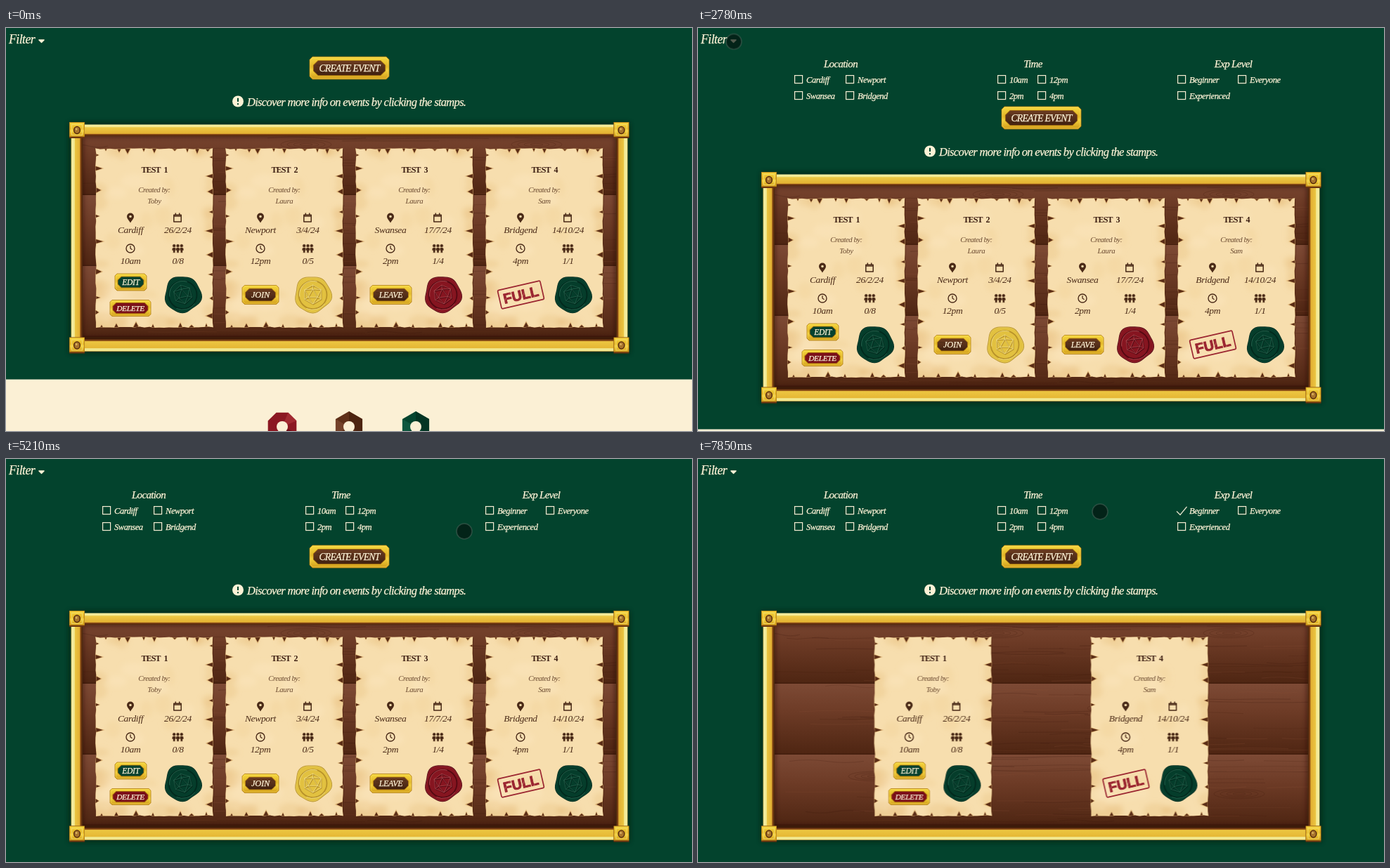
These frames come from a looping animation (976 by 574 pixels, 8 s). An HTML page:

```html
<!DOCTYPE html>
<html lang="en">
<head>
<meta charset="utf-8">
<title>Event board</title>
<style>
html, body { margin: 0; width: 100%; height: 100%; overflow: hidden; background: #03432d; }
svg { display: block; width: 976px; height: 574px; }
text { font-family: "Liberation Serif", "Times New Roman", serif; font-style: italic; }
.cream { fill: #fdf2d6; stroke: #fdf2d6; stroke-width: .25px; }
.ink { fill: #4a2a17; }
.faint { fill: #6b4a30; }
.title { fill: #3a1c10; font-style: normal; font-weight: bold; word-spacing: 3px; }
.full { fill: #9b2631; stroke: #9b2631; stroke-width: .9px; font: bold 20px "Liberation Sans", Arial, sans-serif; }

.board, .filters, .cursor, .click, .gone, .right, .left, .on, .off {
  animation: 8s step-end infinite;
}
.board { animation-name: drop; }
.filters { animation-name: open; }
.cursor { animation-name: roam; }
.click { animation-name: click; }
.gone, .off { animation-name: gone; }
.on { animation-name: on; }
.right { animation-name: right; }
.left { animation-name: left; }

@keyframes drop {
  0% { transform: translateY(0); }
  34.75% { transform: translateY(71px); }
  37.25% { transform: translateY(82px); }
}
@keyframes open { 0% { opacity: 0; } 34.75% { opacity: 1; } }
@keyframes gone { 0% { opacity: 1; } 77.875% { opacity: 0; } }
@keyframes on { 0% { opacity: 0; } 77.875% { opacity: 1; } }
@keyframes right { 0% { transform: none; } 77.875% { transform: translateX(123.4px); } }
@keyframes left { 0% { transform: none; } 77.875% { transform: translateX(-123.6px); } }
@keyframes click { 0% { opacity: 0; } 75.5% { opacity: 1; } 77.875% { opacity: 0; } }
@keyframes roam {
  0% { opacity: 0; transform: translate(367px, 550px); }
  7.375% { opacity: 1; transform: translate(367px, 550px); }
  10% { transform: translate(72px, 474px); }
  15.25% { transform: translate(57px, 316px); }
  17.625% { transform: translate(74px, 170px); }
  20.125% { transform: translate(86px, 90px); }
  22.625% { transform: translate(83px, 55px); }
  25% { transform: translate(70px, 30px); }
  27.375% { transform: translate(51px, 20.8px); }
  29.875% { transform: translate(51px, 19.5px); }
  45.125% { transform: translate(92px, 30px); }
  47.625% { transform: translate(260px, 82px); }
  50.125% { transform: translate(468px, 146px); }
  52.625% { transform: translate(558px, 169px); }
  57.75% { transform: translate(575px, 158px); }
  60.25% { transform: translate(612px, 131px); }
  62.75% { transform: translate(652px, 103px); }
  65.25% { transform: translate(685px, 82px); }
  67.875% { transform: translate(701px, 74px); }
  70.375% { transform: translate(694px, 73px); }
  72.875% { transform: translate(689px, 70px); }
  77.875% { transform: translate(690px, 70.5px); }
  80.5% { transform: translate(691px, 70px); }
  90.5% { transform: translate(680px, 64px); }
  93% { transform: translate(640px, 57px); }
  95.625% { transform: translate(596px, 64px); }
  98.125% { transform: translate(572px, 75px); }
}
</style>
</head>
<body>
<svg id="stage" viewBox="0 0 976 574" xmlns="http://www.w3.org/2000/svg"></svg>
<script>
let seed = 11;
const rnd = (a = 0, b = 1) => {
  seed = seed * 16807 % 2147483647;
  return a + (b - a) * seed / 2147483647;
};
const many = (n, f) => Array.from({ length: n }, (_, i) => f(i)).join('');
const text = (x, y, s, size, cls, ls = 0, anchor = 'middle') =>
  `<text x="${x}" y="${y}" font-size="${size}" class="${cls}" letter-spacing="${ls}" text-anchor="${anchor}">${s}</text>`;
const rect = (x, y, w, h, fill, more = '') =>
  `<rect x="${x}" y="${y}" width="${w}" height="${h}" fill="${fill}" ${more}/>`;
const at = (x, y, body) => `<g transform="translate(${x} ${y})">${body}</g>`;
const grad = (id, stops, flat) =>
  `<linearGradient id="${id}" x2="${flat ? 1 : 0}" y2="${flat ? 0 : 1}">` +
  stops.map(([o, c]) => `<stop offset="${o}" stop-color="${c}"/>`).join('') + '</linearGradient>';
const ring = (n, r, turn = 0) =>
  Array.from({ length: n }, (_, i) => {
    const a = turn + i * 2 * Math.PI / n, d = typeof r === 'function' ? r(a) : r;
    return [(d * Math.cos(a)).toFixed(2), (d * Math.sin(a)).toFixed(2)];
  });

// Wood planks with grain and a few knots
function wood() {
  const grain = y => many(46, () => {
    const x = rnd(90, 840), len = rnd(50, 240), b = rnd(-4, 4).toFixed(1);
    const dark = rnd() < .65;
    return `<path d="M${x.toFixed(0)} ${(y + rnd(3, 98)).toFixed(1)}q${(len / 4).toFixed(0)} ${b} ${(len / 2).toFixed(0)} 0t${(len / 2).toFixed(0)} 0"
      stroke="${dark ? '#3b180a' : '#95593e'}" stroke-opacity="${dark ? .2 : .16}" stroke-width="${rnd(.6, 1.4).toFixed(1)}"/>`;
  });
  const knot = (x, y) => many(4, i =>
    `<ellipse cx="${x}" cy="${y}" rx="${9 + i * 9}" ry="${1.5 + i * 1.8}" stroke="#3b180a" stroke-opacity=".22"/>`);
  const plank = y => rect(106, y, 764, 101, 'url(#plank)') + rect(106, y + 99.5, 764, 1.5, '#3d1a0b', 'opacity=".6"');
  return `<g clip-path="url(#inside)" fill="none">${[137, 238, 339].map(y => plank(y) + grain(y)).join('')}
    ${rect(106, 440, 764, 12, '#4a2110')}
    ${[[427, 166], [755, 166], [590, 273], [250, 370], [770, 395]].map(p => knot(...p)).join('')}
    <rect x="104" y="149" width="768" height="297" stroke="#280e04" stroke-width="12" opacity=".55" filter="url(#soft)"/></g>`;
}

function frame() {
  const corner = (x, y) => at(x, y,
    rect(-11, -11.5, 22, 23, '#6b3510') + rect(-10.5, -11, 21, 20, 'url(#gold)', 'stroke="#c08a20" stroke-width=".8"') +
    rect(-7.5, -8, 15, 15, 'none', 'stroke="#f8e176" stroke-opacity=".8"') +
    '<ellipse rx="5" ry="5.8" fill="#4c220d"/><ellipse rx="3.6" ry="4.4" fill="#a8742c"/><ellipse cx="-.8" cy="-1.4" rx="1.4" ry="1.6" fill="#d9b160"/>');
  return rect(95, 140, 787, 318, 'none', 'stroke="#001a10" stroke-width="10" opacity=".7" filter="url(#soft)"') +
    wood() +
    rect(92.5, 146, 16.5, 306, 'url(#barL)') + rect(868, 146, 16.5, 306, 'url(#barR)') +
    rect(101, 137.5, 775, 16.5, 'url(#barT)') + rect(101, 443, 775, 18, 'url(#barB)') +
    [101, 875.5].map(x => corner(x, 145.5) + corner(x, 452)).join('');
}

// Torn paper: jittered outline plus dark rips along each side
function paper() {
  const W = 168, H = 256, pts = [], j = () => rnd(0, 1.5);
  for (let x = 0; x < W; x += 7) pts.push([x, j()]);
  for (let y = 0; y < H; y += 8) pts.push([W - j(), y]);
  for (let x = W; x > 0; x -= 7) pts.push([x, H - j()]);
  for (let y = H; y > 0; y -= 8) pts.push([j(), y]);
  const d = 'M' + pts.map(p => p.map(v => v.toFixed(1)).join(' ')).join('L') + 'Z';
  const rip = (x, y, dx, dy, n, w) => {
    const tri = (k, c) => `<path d="M${x - dy * w * k} ${y - dx * w * k}L${x + dx * n * k} ${y + dy * n * k}L${x + dy * w * k} ${y + dx * w * k}Z" fill="${c}"/>`;
    return tri(1.25, '#dfb677') + tri(1, '#5b2d16');
  };
  const side = (list, place) => list.map((p, i) => {
    const [x, y, dx, dy] = place(p);
    return rip(x, y, dx, dy, dx ? 5 + i * 5 % 7 : 4 + i * 2 % 5, 2.2 + i % 3);
  }).join('');
  const rips =
    side([15, 34, 46, 69, 84, 113, 131, 145, 160], p => [p, 0, 0, 1]) +
    side([13, 40, 62, 91, 118, 152, 180, 214, 239], p => [W, p, -1, 0]) +
    side([9, 30, 58, 82, 121, 137, 158], p => [p, H, 0, -1]) +
    side([10, 29, 60, 97, 133, 176, 213, 234], p => [0, p, 1, 0]);
  const stains = many(24, i => {
    const edge = i % 2, x = edge ? rnd(0, W) : (i % 4 ? 4 : W - 4), y = edge ? (i % 4 > 1 ? 5 : H - 8) : rnd(0, H);
    return `<ellipse cx="${x.toFixed(0)}" cy="${y.toFixed(0)}" rx="${rnd(6, 19).toFixed(0)}" ry="${rnd(5, 16).toFixed(0)}" fill="#e3b56c" opacity=".24"/>`;
  });
  const clouds = many(16, () =>
    `<ellipse cx="${rnd(15, 150).toFixed(0)}" cy="${rnd(15, 240).toFixed(0)}" rx="${rnd(8, 24).toFixed(0)}" ry="${rnd(6, 16).toFixed(0)}" fill="${rnd() < .5 ? '#fbe8c0' : '#efd096'}" opacity=".34"/>`);
  return `<clipPath id="edge"><path d="${d}"/></clipPath>
    <g id="paper"><path d="${d}" fill="#4b210e" transform="translate(1 1)" opacity=".6"/>
    <g clip-path="url(#edge)"><path d="${d}" fill="#f7deae"/><g filter="url(#soft)">${clouds}${stains}</g>${rips}
    <path d="${d}" fill="none" stroke="#dcb277" stroke-opacity=".6"/></g></g>`;
}

function button(x, y, w, h, fill, label, size, ls) {
  const plate = (a, b, c) => `M${-a + c} ${-b}H${a - c}L${a} ${-b + c}V${b - c}L${a - c} ${b}H${-a + c}L${-a} ${b - c}V${-b + c}Z`;
  const a = w / 2, b = h / 2, k = h / 6.5;
  return at(x, y, `<path d="${plate(a, b, k * .8)}" fill="url(#gold)" stroke="#b07c12" stroke-width=".8"/>
    <path d="${plate(a - 1.2, b - 1.2, k * .7)}" fill="none" stroke="#fbe568" stroke-opacity=".6" stroke-width=".8"/>
    <path d="${plate(a - k, b - k, k * 1.4)}" fill="#a8730f"/>
    <path d="${plate(a - k - .8, b - k - .8, k * 1.3)}" fill="${fill}"/>
    <path d="M${-a + k * 2} ${-b * .25}q${a / 2} 2 ${a} 0t${a - k * 4} 0M${-a + k * 2} ${b * .4}q${a / 2} -2 ${a} 0t${a - k * 4} 0" fill="none" stroke="#000" stroke-opacity=".18"/>` +
    text(0, size * .34, label, size, 'cream', ls));
}

function seal(x, y, [base, dark, light], turn) {
  const blob = (k, s) => 'M' + ring(48, a => k + 1.1 * Math.sin(5 * a + s) + .9 * Math.sin(3 * a + 1 + s)).map(p => p.join(' ')).join('L') + 'Z';
  const hex = ring(6, 13.5, turn), tri = ring(3, 7.6, turn);
  const spokes = tri.map((p, i) => [-1, 0, 1].map(k => `M${p.join(' ')}L${hex[(2 * i + k + 6) % 6].join(' ')}`).join('')).join('');
  const die = `M${hex.join('L')}ZM${tri.join('L')}Z${spokes}`;
  return at(x, y, `<path d="${blob(26, turn)}" fill="${dark}"/>
    <path d="${blob(24.9, turn)}" fill="${base}" stroke="${light}" stroke-opacity=".5" stroke-width=".6"/>
    <circle r="20" cy=".6" fill="none" stroke="${dark}" stroke-width="1.8"/>
    <path d="M-18.6 3A18.8 18.8 0 0 1 6 -18" fill="none" stroke="${light}" stroke-width=".9"/>
    <path d="M17 13A21.5 21.5 0 0 1 -9 20" fill="none" stroke="${light}" stroke-width=".8"/>
    <g fill="none" stroke-linejoin="round"><path d="${die}" stroke="${dark}" stroke-width="1.4" transform="translate(.6 .8)"/>
    <path d="${die}" stroke="${light}" stroke-width=".7"/></g>`);
}

const icons = {
  pin: '<path class="ink" fill-rule="evenodd" d="M0 7C-1.5 4-5 1-5-2A5 5 0 0 1 5-2C5 1 1.5 4 0 7ZM-1.8-2a1.8 1.8 0 0 0 3.6 0a1.8 1.8 0 0 0-3.6 0"/>',
  date: '<path d="M-5.2-4.3H5.2V5.6H-5.2ZM-5.2-2.4H5.2M-2.7-7v3M2.7-7v3" fill="none" stroke="#4a2a17" stroke-width="1.5" stroke-linejoin="round"/>',
  clock: '<circle r="6" fill="none" stroke="#4a2a17" stroke-width="1.4"/><path d="M0-3.8V0L2.6 1.8" fill="none" stroke="#4a2a17" stroke-width="1.3"/>',
  people: [-5.3, 5.3, 0].map(x => `<g class="ink" stroke="#f4daa8" stroke-width=".5"><circle cx="${x}" cy="-3.8" r="2.4"/><path d="M${x - 3} 1q0-2.6 3-2.6t3 2.6v2h-1.4v3.2h-3.2V3h-1.4Z"/></g>`).join('')
};

const GREEN = ['#053d2b', '#02291d', '#2a6b54'], RED = ['#861520', '#540912', '#b34d54'], GOLD = ['#e2c140', '#b8922a', '#f5e38c'];
const BROWN = 'url(#panel)';

function card(i, cls, by, place, date, time, seats, action, wax, turn) {
  const line = (x, y, s) => text(x, y, s, 13.5, 'ink', -.35);
  return `<g class="${cls}">` + at(127 + i * 185, 171, '<use href="#paper"/>' +
    text(84, 34.5, 'TEST ' + (i + 1), 12, 'title', -.9) +
    text(84, 63, 'Created by:', 10.8, 'faint', -.5) + text(84, 79, by, 10.8, 'faint', -.3) +
    at(50, 99.5, icons.pin) + at(117, 99.5, icons.date) + line(50, 120.5, place) + line(117.5, 120.5, date) +
    at(50, 143, icons.clock) + at(117.5, 143, icons.people) + line(50, 164.5, time) + line(117.5, 164.5, seats) +
    action + seal(124.5, 208.5, wax, turn)) + '</g>';
}

const stamp = at(50.5, 209, `<g transform="rotate(-13)">
  <rect x="-31" y="-13.5" width="62" height="27" rx="2" fill="none" stroke="#9b2631" stroke-width="1.7"/>
  <text class="full" y="7.2" text-anchor="middle">FULL</text>
  <path d="M-27 6L-12-9M-4 11L9-7M15 10L29-6" stroke="#f4d8a8" stroke-width=".6" opacity=".5"/></g>`);

const cards =
  card(0, 'right', 'Toby', 'Cardiff', '26/2/24', '10am', '0/8',
    button(50.5, 191, 45, 24, '#05422f', 'EDIT', 11.6, -.3) + button(50, 228, 58, 23, '#7d1019', 'DELETE', 11.4, -.35), GREEN, .3) +
  card(1, 'gone', 'Laura', 'Newport', '3/4/24', '12pm', '0/5', button(50, 209, 52, 27, BROWN, 'JOIN', 12.4, -.2), GOLD, .52) +
  card(2, 'gone', 'Laura', 'Swansea', '17/7/24', '2pm', '1/4', button(50.5, 209, 59, 27, BROWN, 'LEAVE', 12, -.4), RED, .4) +
  card(3, 'left', 'Sam', 'Bridgend', '14/10/24', '4pm', '1/1', stamp, GREEN, .3);

function badge(x, n, fill, shade, light) {
  const p = ring(n, 22, n === 6 ? -Math.PI / 2 : Math.PI / 8);
  return at(x, 568, `<path d="M${p.join('L')}Z" fill="${fill}"/>
    <path d="M${p[0]}L${p[1]}L${p[2]}L0 0Z" fill="${shade}"/><path d="M${p[n - 1]}L${p[n - 2]}L0 0Z" fill="${light}"/>
    <circle r="8" fill="#fbf0d5"/>`);
}

const board = `<g class="board">
  ${rect(0, 500.5, 976, 200, '#fbf0d5')}
  ${badge(393, 8, '#8b1822', '#6f0f18', '#a12a31')}${badge(488, 6, '#5f3019', '#4c2410', '#74422a')}${badge(583, 6, '#04452f', '#033524', '#0d573f')}
  ${button(488.5, 57, 113, 32, BROWN, 'CREATE EVENT', 13.8, -.8)}
  <circle cx="330" cy="104.5" r="8" fill="#fdf2d6"/>
  <path d="M330 99.7v5.2M330 107.3v2" stroke="#03432d" stroke-width="2"/>
  ${text(343, 110.5, 'Discover more info on events by clicking the stamps.', 16.5, 'cream', -.69, 'start')}
  ${frame()}${cards}</g>`;

const option = (x, y, s) =>
  `<rect x="${x + .6}" y="${y + .6}" width="11" height="11" fill="none" stroke="#f6ecd2" stroke-width="1.2" ${s === 'Beginner' ? 'class="off"' : ''}/>` +
  text(x + 17, y + 10.8, s, 12.6, 'cream', -.5, 'start');
const group = (x, title, x1, x2, labels) =>
  text(x, 55.5, title, 15, 'cream', -.65) +
  labels.map((s, i) => option(i % 2 ? x2 : x1, i < 2 ? 67 : 90, s)).join('');

const filters = `<g class="filters">
  ${group(203, 'Location', 137, 210, ['Cardiff', 'Newport', 'Swansea', 'Bridgend'])}
  ${group(476.5, 'Time', 426, 483, ['10am', '12pm', '2pm', '4pm'])}
  ${group(761.5, 'Exp Level', 682, 768, ['Beginner', 'Everyone', 'Experienced'])}
  <path class="on" d="M681 74.5L686 79.5L695.5 68" fill="none" stroke="#e6e3cc" stroke-width="1.2"/></g>`;

const cursor = `<g class="cursor">
  <circle r="11" fill="#04140f" fill-opacity=".68" stroke="#4d665b" stroke-opacity=".55" stroke-width="1.6"/>
  <g class="click"><circle r="13.2" fill="#7d8a10"/><rect x="-6.5" y="-2.5" width="11" height="11" fill="none" stroke="#a8ad45"/></g></g>`;

const defs = `<defs>
  ${grad('plank', [[0, '#7d4a35'], [.4, '#6d3b26'], [1, '#4e2512']])}
  ${grad('panel', [[0, '#6b3b20'], [.5, '#57301a'], [1, '#432210']])}
  ${grad('gold', [[0, '#f6d840'], [.45, '#e3b526'], [.6, '#f2cf3c'], [1, '#d09a17']])}
  ${grad('barT', [[0, '#f4efa2'], [.22, '#f2e78c'], [.25, '#ecc944'], [.78, '#e3b132'], [.84, '#8a4c16'], [1, '#4a200d']])}
  ${grad('barB', [[0, '#4a200d'], [.14, '#96581a'], [.2, '#ecc641'], [.7, '#e6b835'], [.76, '#f2e88f'], [.92, '#f2e88f'], [1, '#7b5a1b']])}
  ${grad('barL', [[0, '#c9b55c'], [.1, '#f6f0a6'], [.3, '#f2e68a'], [.34, '#ebc542'], [.74, '#e2b033'], [.82, '#874914'], [1, '#43200d']], 1)}
  ${grad('barR', [[0, '#43200d'], [.16, '#874914'], [.24, '#e2b033'], [.66, '#ebc542'], [.7, '#f2e68a'], [.92, '#f6f0a6'], [1, '#c9b55c']], 1)}
  <filter id="soft" x="-10%" y="-10%" width="120%" height="120%"><feGaussianBlur stdDeviation="3.5"/></filter>
  <clipPath id="inside"><rect x="106" y="150" width="764" height="295"/></clipPath>
  ${paper()}</defs>`;

document.getElementById('stage').innerHTML = defs + rect(0, 0, 976, 574, '#03432d') + board + filters +
  text(4, 21.5, 'Filter', 18, 'cream', -.65, 'start') +
  '<path d="M47 17H54L50.5 20.3Z" fill="#fdf2d6" stroke="#fdf2d6" stroke-width="1.6" stroke-linejoin="round"/>' + cursor;
</script>
</body>
</html>
```
